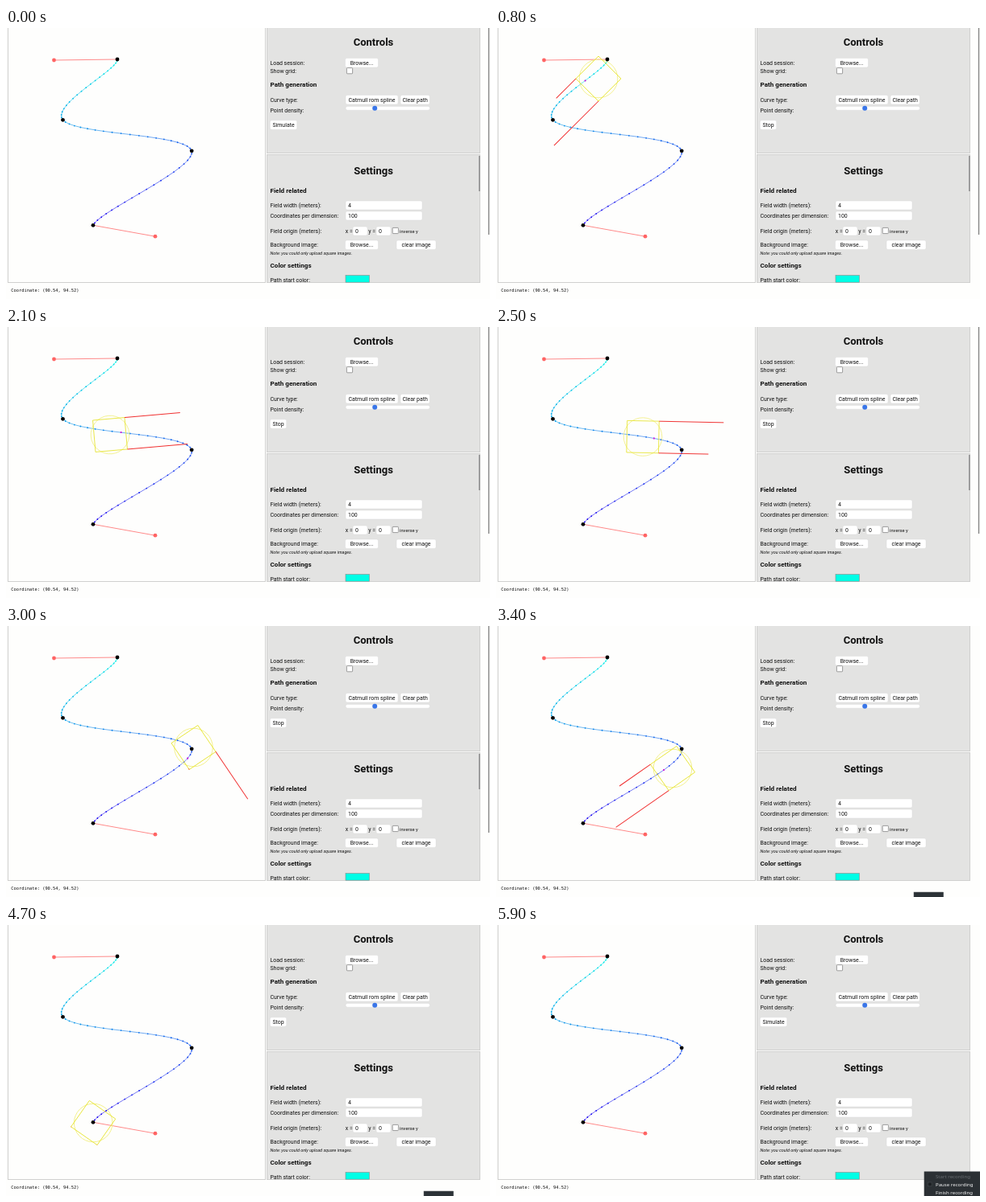
An HTML page for the animation above (6 s loop, 600 px wide and 337 px high).

```html
<!DOCTYPE html>
<html lang="en">
<head>
<meta charset="utf-8">
<title>Path simulator</title>
<style>
  html, body { margin: 0; width: 100%; height: 100%; overflow: hidden; background: #fefefd; }
  svg { display: block; width: 600px; height: 337px; }
  text { font: 6.95px Roboto, sans-serif; fill: #111; }
  .title { font-size: 13px; font-weight: 600; }
  .head { font-size: 8.1px; font-weight: 600; }
  .small { font-size: 5.8px; }
  .note { font-size: 5.42px; font-style: italic; }
  .mono { font: 5.4px "DejaVu Sans Mono", monospace; }
  .menu { font: 6.1px "Noto Sans", sans-serif; fill: #f4f4f4; }
  .off { fill: #686d71; }
  .mid { text-anchor: middle; }
</style>
</head>
<body>
<svg id="stage" viewBox="0 0 600 337"></svg>
<script>
const LOOP = 6000;
const svg = document.getElementById('stage');

function add(tag, attrs, parent = svg) {
  const node = document.createElementNS('http://www.w3.org/2000/svg', tag);
  for (const key in attrs) node.setAttribute(key, attrs[key]);
  return parent.appendChild(node);
}
const rect = (x, y, width, height, fill, more, parent) =>
  add('rect', { x, y, width, height, fill, ...more }, parent);
const line = (a, b, stroke, width, parent) =>
  add('line', { x1: a[0], y1: a[1], x2: b[0], y2: b[1], stroke, 'stroke-width': width }, parent);
const dot = (p, r, fill, parent) => add('circle', { cx: p[0], cy: p[1], r, fill }, parent);
function text(x, y, value, cls = '', parent) {
  const node = add('text', { x, y, class: cls }, parent);
  node.textContent = value;
  return node;
}
const label = (y, value, cls) => text(327.5, y, value, cls);
const field = (x, y, w, h, parent) =>
  rect(x, y, w, h, '#fff', { rx: 2, stroke: '#d6d6d6', 'stroke-width': 0.4 }, parent);
function button(x, y, w, value) {
  const g = add('g');
  field(x, y, w, 11.5, g);
  text(x + w / 2, y + 8.2, value, 'mid', g);
  return g;
}
function input(x, y, w, value) {
  field(x, y, w, 11);
  text(x + 3, y + 8, value);
}
const check = (x, y) =>
  rect(x, y, 7.2, 7.2, '#fff', { rx: 0.8, stroke: '#777', 'stroke-width': 0.7 });
const panel = (x, y, w, h, fill) => rect(x, y, w, h, fill, { stroke: '#d0d0cf' });
const show = (node, on) => node.setAttribute('visibility', on ? 'visible' : 'hidden');

// Panels and controls
panel(2.5, -0.5, 319, 317, '#fefefd');
panel(323.5, -0.5, 264, 156, '#e3e3e2');
panel(323.5, 157.5, 264, 159, '#e3e3e2');

text(455.5, 22, 'Controls', 'title mid');
label(45.5, 'Load session:');
button(420.5, 37.5, 41, 'Browse...');
label(55.7, 'Show grid:');
check(422.4, 49.6);
label(73, 'Path generation', 'head');
label(91.5, 'Curve type:');
button(421, 83.4, 65, 'Catmull rom spline');
button(489, 83.4, 36.3, 'Clear path');
label(104.5, 'Point density:');
rect(421, 97.4, 104.5, 4.8, '#fff', { rx: 2.4, stroke: '#d6d6d6', 'stroke-width': 0.4 });
dot([457.2, 99.8], 3, '#3a76e8');
const simulate = button(327.3, 114.8, 33.5, 'Simulate');
const stop = button(327.3, 114.8, 20.4, 'Stop');

text(455.5, 182, 'Settings', 'title mid');
label(205, 'Field related', 'head');
label(223.2, 'Field width (meters):');
input(421, 215, 95, '4');
label(235.8, 'Coordinates per dimension:');
input(421, 228, 95, '100');
label(255, 'Field origin (meters):');
text(420.8, 255, 'x =');
input(430, 247, 18, '0');
text(449.3, 255, 'y =');
input(459, 247, 18, '0');
check(479.2, 248.4);
text(488, 254.6, 'inverse y', 'small');
label(272.2, 'Background image:');
button(420.5, 264, 41, 'Browse...');
button(484, 264, 49, 'clear image');
label(281.6, 'Note: you could only upload square images.', 'note');
label(298.3, 'Color settings', 'head');
label(315.6, 'Path start color:');
rect(421, 307.6, 29.3, 8.6, '#00ffe6', { stroke: '#888', 'stroke-width': 0.6 });
text(6.2, 328, 'Coordinate: (90.54, 94.52)', 'mono');

const panelBar = rect(586.2, 159, 1.4, 44, '#858585');
const pageBar = rect(597.8, 0, 1.4, 257, '#858585');

// Catmull-Rom path; the first and last points only steer the ends
const anchors = [[59.5, 40], [138, 39], [70.5, 114.3], [230.2, 152.8], [108, 245.3], [185, 259.2]];
const STEPS = 20;

const hermite = (a, ta, b, tb, u) =>
  (1 + 2 * u) * (1 - u) ** 2 * a + u * (1 - u) ** 2 * ta +
  u * u * (3 - 2 * u) * b + u * u * (u - 1) * tb;

const path = [];
for (let i = 1; i < 4; i++) {
  const [p, a, b, n] = anchors.slice(i - 1, i + 3);
  for (let s = i > 1 ? 1 : 0; s <= STEPS; s++)
    path.push([0, 1].map(k =>
      hermite(a[k], (b[k] - p[k]) / 2, b[k], (n[k] - a[k]) / 2, s / STEPS)));
}
const shade = (u, alpha) => `rgba(${30 * u},${245 * (1 - u)},${230 + 10 * u},${alpha})`;

line(anchors[0], anchors[1], '#ff8a8a', 1);
line(anchors[4], anchors[5], '#ff8a8a', 1);
path.forEach((p, i) => {
  const u = i / (path.length - 1);
  if (i) line(path[i - 1], p, shade(u, 0.7), 0.85);
  dot(p, 0.9, shade(u, 1));
});

// Robot: a square body with one speed line per wheel
const HALF = 19.8, GAIN = 0.6, CRUISE = 72, LIMIT = 80;
const robot = add('g');
const goal = dot([0, 0], 1, '#f010d8', robot);
const body = add('g', { fill: 'none' }, robot);
add('circle', { r: 23.8, stroke: '#f3f08c', 'stroke-width': 0.9 }, body);
rect(-HALF, -HALF, 2 * HALF, 2 * HALF, 'none', { stroke: '#e8e63c', 'stroke-width': 0.9 }, body);
const wheels = [-1, 1].map(side => line([HALF, side * HALF], [HALF, side * HALF], '#f02c2c', 0.95, body));

anchors.forEach((p, i) => dot(p, 2.4, i % 5 ? '#000' : '#ff6464'));

// Key poses: time in tenths of a second, x, y, heading in degrees
const poses = [
  [5, 138, 39, 90],
  [8, 127, 63, 135],
  [11, 103, 83, 152],
  [14, 76.5, 105, 112],
  [18, 86, 128, 18],
  [21, 129, 134, -5],
  [26, 194, 138, 7],
  [30, 232.5, 151, 56],
  [34, 219, 177, 145],
  [39, 150.5, 213.5, 151],
  [44, 110, 242, 132],
  [47, 108.2, 246, 125]
];
const LAST = poses.length - 1;

function slope(i, k) {
  if (i === LAST) return 0;
  const a = poses[Math.max(i - 1, 0)], b = poses[i + 1];
  return (b[k] - a[k]) / (b[0] - a[0]);
}
function poseAt(t) {
  if (t >= poses[LAST][0]) return poses[LAST];
  const i = Math.max(poses.findIndex(p => p[0] > t) - 1, 0);
  const a = poses[i], b = poses[i + 1], span = b[0] - a[0], u = Math.max((t - a[0]) / span, 0);
  return a.map((v, k) => hermite(v, slope(i, k) * span, b[k], slope(i + 1, k) * span, u));
}
// Differential drive: both wheels share the travel speed, turning splits them
function wheelSpeeds(t) {
  const a = poseAt(t - 0.1), b = poseAt(t + 0.1), perSecond = 50;
  const travel = Math.min(CRUISE, GAIN * perSecond * Math.hypot(b[1] - a[1], b[2] - a[2]));
  const turn = GAIN * perSecond * HALF * (b[3] - a[3]) * Math.PI / 180;
  return [travel + turn, travel - turn].map(s => Math.max(-LIMIT, Math.min(LIMIT, s)));
}

// Recorder popup and menu
const popup = rect(518, 331, 36.7, 7, '#2c3237', { stroke: '#50565a', 'stroke-width': 0.5 });
const menu = add('g');
rect(530.7, 306.5, 70, 31, '#2b3034', {}, menu);
['Start', 'Pause', 'Finish'].forEach((verb, i) =>
  text(545, 314.7 + 10 * i, verb + ' recording', i ? 'menu' : 'menu off', menu));
rect(535.3, 320, 4.8, 4.8, '#1b1f22', { stroke: '#4c5155', 'stroke-width': 0.5 }, menu);

function draw() {
  const ms = Math.floor(performance.now() % LOOP / 100) * 100;
  const running = ms >= 500 && ms < 5500;
  show(simulate, !running);
  show(stop, running);
  simulate.firstChild.setAttribute('fill', ms >= 200 && ms < 500 ? '#ececec' : '#fff');
  show(panelBar, ms < 3200);
  show(pageBar, ms < 3400);
  show(popup, ms >= 3200 && ms < 5300);
  show(menu, ms >= 5700);
  show(robot, running);
  if (running) {
    const t = ms / 100, [, x, y, heading] = poseAt(t), speeds = wheelSpeeds(t);
    body.setAttribute('transform', `translate(${x} ${y}) rotate(${heading})`);
    wheels.forEach((w, i) => w.setAttribute('x2', HALF + speeds[i]));
    const ahead = path.findLast(p => Math.hypot(p[0] - x, p[1] - y) < 17.5) || path[0];
    goal.setAttribute('cx', ahead[0]);
    goal.setAttribute('cy', ahead[1]);
  }
  requestAnimationFrame(draw);
}
draw();
</script>
</body>
</html>
```
